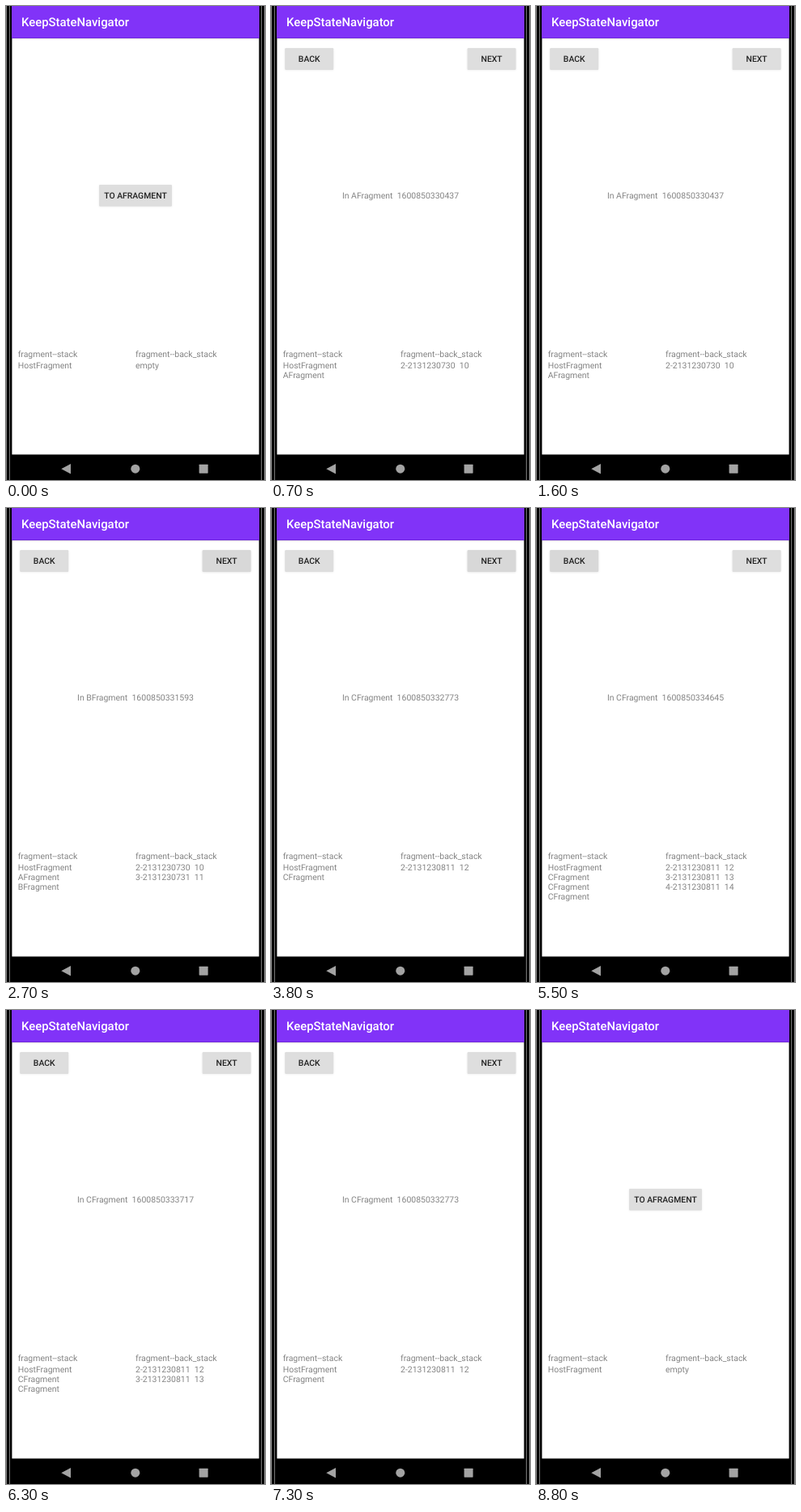
Write an HTML page that moves like this. It is 320x586 px and loops after 9200 ms.

```html
<!DOCTYPE html>
<html lang="en">
<head>
<meta charset="utf-8">
<title>Fragment navigation</title>
<style>
  html, body { margin: 0; width: 100%; height: 100%; overflow: hidden; background: #000; }
  svg { display: block; width: 320px; height: 586px; }
  text { font: 400 10.47px Roboto, sans-serif; fill: #848484; white-space: pre; text-rendering: geometricPrecision; }
  .title { font-size: 14.88px; font-weight: 500; fill: #fff; }
  .button text { font-size: 10.42px; font-weight: 500; fill: #222; text-anchor: middle; }
  .mid { text-anchor: middle; }
</style>
</head>
<body>
<svg viewBox="0 0 320 586">
  <defs>
    <linearGradient id="drop" x2="0" y2="1">
      <stop stop-color="#000" stop-opacity=".12"/>
      <stop offset="1" stop-color="#000" stop-opacity="0"/>
    </linearGradient>
    <filter id="soft" x="-20%" y="-40%" width="140%" height="180%">
      <feGaussianBlur stdDeviation="1.5"/>
    </filter>
  </defs>

  <rect width="320" height="586"/>
  <path d="M.5 0V586M319.5 0V586" stroke="#8a8a8a"/>
  <path d="M4.5 0V586M315.5 0V586" stroke="#777"/>
  <rect x="7.4" width="305.2" height="554.5" fill="#fff"/>
  <rect x="7" y="40" width="306" height="2" fill="url(#drop)"/>
  <rect x="7" width="306" height="40" fill="#8133f8"/>
  <rect x="7" y="39" width="306" height="1" fill="#7029dc"/>
  <text class="title" x="19" y="24.9">KeepStateNavigator</text>

  <g id="controls"></g>
  <text id="label" class="mid" x="160" y="238.2"></text>
  <text x="14.7" y="434.2">fragment--stack</text>
  <text x="160" y="434.2">fragment--back_stack</text>
  <g id="rows"></g>

  <g fill="#a3a3a3">
    <path d="M68.3 572.2L80 566V578.4Z"/>
    <circle cx="159.8" cy="572.2" r="5.5"/>
    <rect x="238.6" y="566.7" width="11" height="11" rx=".6"/>
  </g>
</svg>
<script>
const LOOP = 9200, STEP = 100;
const NS = "http://www.w3.org/2000/svg";
const $ = id => document.getElementById(id);

function add(parent, tag, attrs, text) {
  const node = document.createElementNS(NS, tag);
  for (const key in attrs) node.setAttribute(key, attrs[key]);
  if (text) node.textContent = text;
  return parent.appendChild(node);
}

function makeButton(label, x, y, width) {
  const g = add($("controls"), "g", { class: "button" });
  const box = { x, y, width, height: 26.8, rx: 1.2 };
  const shadow = add(g, "rect", { ...box, y: y + 0.6, filter: "url(#soft)" });
  const face = add(g, "rect", box);
  add(g, "text", { x: x + width / 2, y: y + 17.2 }, label);
  return { g, shadow, face };
}

const buttons = {
  open: makeButton("TO AFRAGMENT", 115, 220.9, 90),
  back: makeButton("BACK", 17.2, 52.1, 60),
  next: makeButton("NEXT", 242.6, 52.1, 60)
};

const rows = [0, 1, 2, 3].map(i => {
  const y = 448.2 + i * 12;
  return [14.7, 160].map(x => add($("rows"), "text", { x, y }));
});

// Each entry: fragment letter, creation time, destination id, serial
const entry = (name, time, dest, serial) => ({ name: name + "Fragment", time, dest, serial });
const a = entry("A", "1600850330437", "2131230730", 10);
const b = entry("B", "1600850331593", "2131230731", 11);
const c1 = entry("C", "1600850332773", "2131230811", 12);
const c2 = entry("C", "1600850333717", "2131230811", 13);
const c3 = entry("C", "1600850334645", "2131230811", 14);

// Start time and stack of each screen
const screens = [
  [0, []], [700, [a]], [1900, [a, b]], [3000, [c1]], [4000, [c1, c2]],
  [4900, [c1, c2, c3]], [5800, [c1, c2]], [6700, [c1]], [7800, []]
];

// Button, touch time, release time
const presses = [
  ["open", 300, 700], ["next", 1600, 1900], ["next", 2600, 3000],
  ["next", 3700, 4000], ["next", 4400, 4900], ["back", 5400, 5800],
  ["back", 6400, 6700], ["back", 7500, 7800]
];

function pressure(name, t) {
  const hit = presses.find(p => p[0] === name && t >= p[1] && t < p[2]);
  return hit ? Math.min(1, ((t - hit[1]) / 200) ** 2) : 0;
}

function draw(t) {
  const stack = screens.filter(s => s[0] <= t).pop()[1];
  const top = stack[stack.length - 1];

  $("label").textContent = top ? `In ${top.name}  ${top.time}` : "";
  rows.forEach(([left, right], i) => {
    const item = stack[i];
    left.textContent = i === 0 ? "HostFragment" : stack[i - 1] ? stack[i - 1].name : "";
    right.textContent = item ? `${i + 2}-${item.dest}  ${item.serial}`
      : i === 0 ? "empty" : "";
  });

  for (const name in buttons) {
    const { g, shadow, face } = buttons[name];
    const p = pressure(name, t);
    const grey = Math.round(222 - 23 * p);
    g.style.display = (name === "open") === !top ? "" : "none";
    face.setAttribute("fill", `rgb(${grey},${grey},${grey})`);
    shadow.setAttribute("opacity", 0.07 + 0.15 * p);
  }
}

function tick() {
  const t = performance.now() % LOOP;
  draw(Math.floor(t / STEP) * STEP);
  requestAnimationFrame(tick);
}
tick();
</script>
</body>
</html>
```
